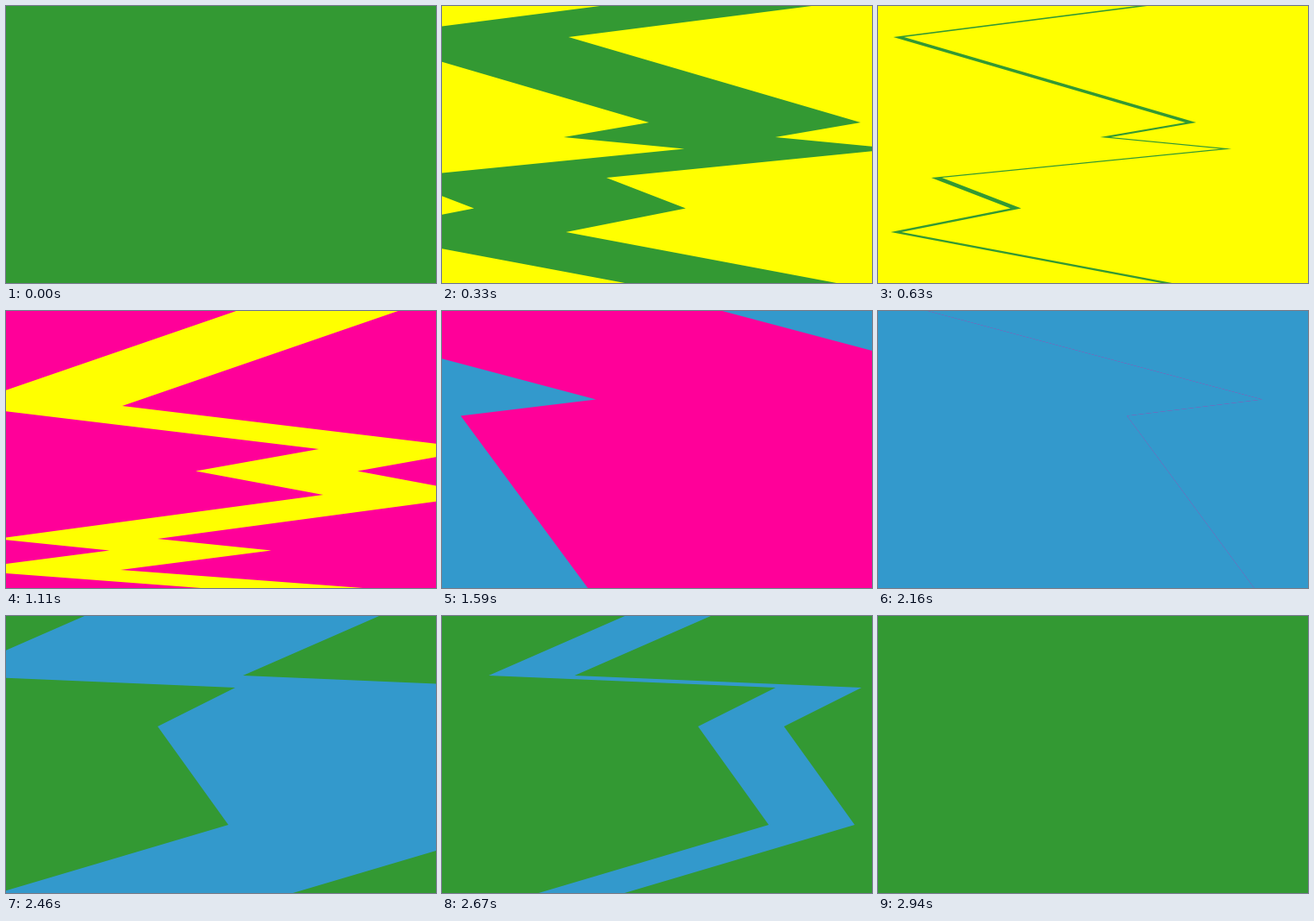
An HTML page that plays this animation: 499 px wide and 321 px high, repeating every 2970 ms.

```html
<!DOCTYPE html>
<html lang="en">
<head>
<meta charset="utf-8">
<title>Zigzag wipes</title>
<style>
  html, body { margin: 0; width: 100%; height: 100%; overflow: hidden; }
  svg { display: block; width: 100%; height: 100%; }
</style>
</head>
<body>
<svg viewBox="0 0 499 321">
  <rect id="old" width="499" height="321"/>
  <polygon id="left"/>
  <polygon id="right"/>
</svg>
<script>
const LOOP = 2970, STEP = 30, SPEED = 1.215, FAR = 1500;
const colors = ['#339933', '#ffff00', '#ff0099', '#3399cc'];

// Corners of the line where the two halves of each wipe meet; `end` is in steps.
const wipes = [
  { end: 23.9, seam: '306,0 24,36 363,135 264,152 404,165.5 68,199 160,234.5 21,262 335,321' },
  { end: 48.28, seam: '361,0 41,110 457,160 314,185.5 462,213 82,264 214,277.5 39,300 320,321' },
  { end: 72.03, seam: '58,0 446,102.5 289,121.5 436.5,321' },
  { end: 97.22, seam: '262,0 104,69 437,83 347,128 429,242 162,321' }
].map(({ end, seam }) => ({ end, seam: seam.split(' ').map(p => p.split(',').map(Number)) }));

const [old, left, right] = ['old', 'left', 'right'].map(id => document.getElementById(id));

// Fills everything on one side (-1 left, 1 right) of the shifted seam.
function drawHalf(shape, seam, side, shift, color) {
  const edge = seam.map(([x, y]) => [x + side * shift, y]);
  shape.setAttribute('points', [[side * FAR, 0], ...edge, [side * FAR, 321]].join(' '));
  shape.setAttribute('fill', color);
}

function draw(ms) {
  const step = Math.floor(ms % LOOP / STEP);
  const index = wipes.findIndex(wipe => step > 0 && step <= wipe.end);
  const current = colors[Math.max(index, 0)];
  const active = index >= 0;

  old.setAttribute('fill', current);
  for (const half of [left, right]) half.setAttribute('visibility', active ? 'visible' : 'hidden');
  if (!active) return;

  const { end, seam } = wipes[index];
  const shift = (SPEED * (end - step)) ** 2 / 2; // quadratic ease-out
  const next = colors[(index + 1) % colors.length];
  drawHalf(left, seam, -1, shift, next);
  drawHalf(right, seam, 1, shift, next);
}

const start = performance.now();
function tick() {
  draw(performance.now() - start);
  requestAnimationFrame(tick);
}
tick();
</script>
</body>
</html>
```
